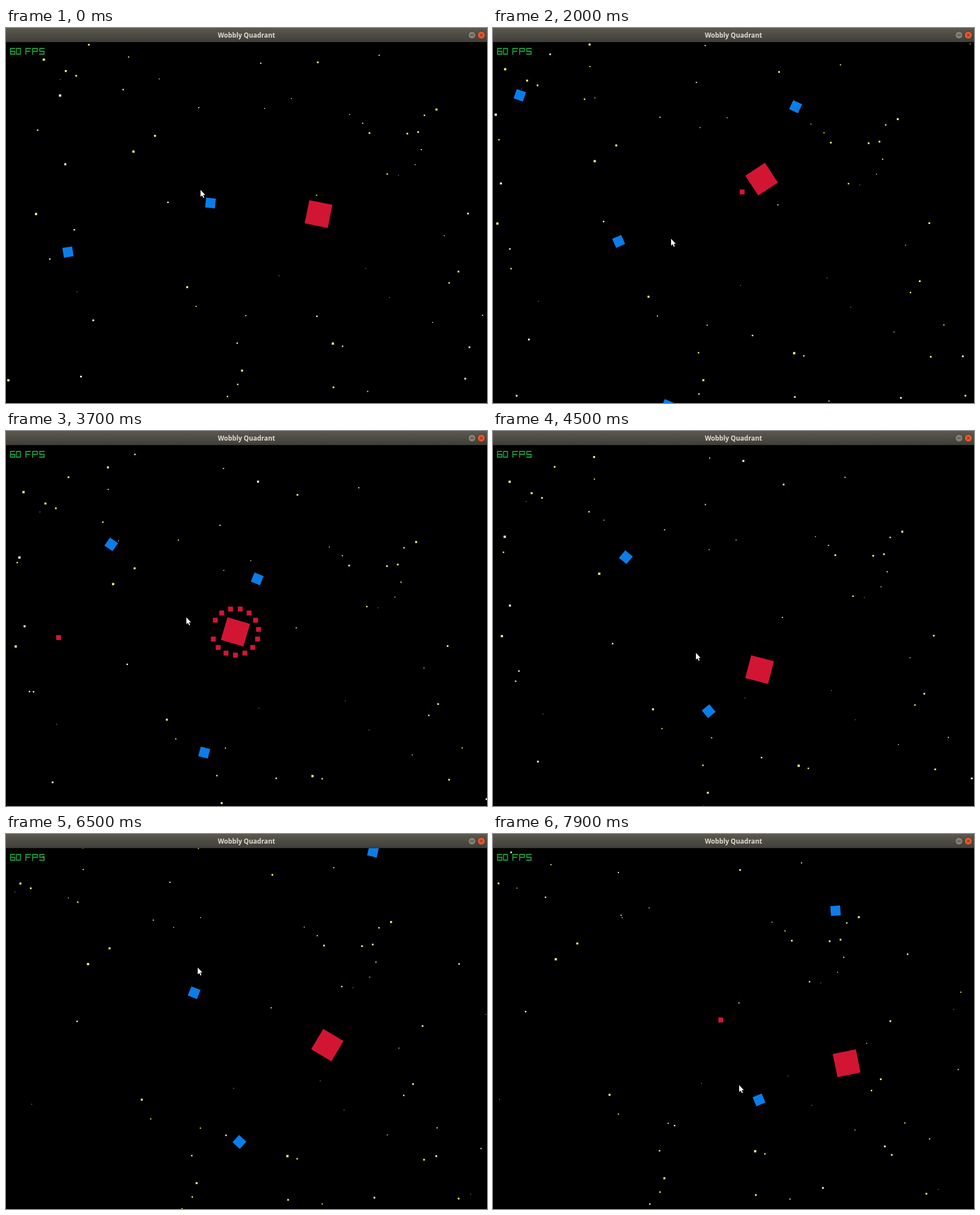
An HTML page with a canvas that plays this animation: 848x660 px, repeating every 8000 ms.

```html
<!DOCTYPE html>
<html lang="en">
<head>
<meta charset="utf-8">
<title>Wobbly Quadrant</title>
<style>
  html, body { margin: 0; width: 100%; height: 100%; overflow: hidden; background: #000; }
  canvas, svg { position: absolute; left: 0; top: 0; display: block; }
  .bar {
    position: absolute; left: 0; top: 0; width: 848px; height: 25px;
    box-sizing: border-box; border-bottom: 1px solid #33322c;
    background: linear-gradient(#5b594f, #403f39);
    color: #dfdbd2; text-align: center;
    font: bold 11.5px/25px "Open Sans", "Noto Sans", sans-serif;
  }
</style>
</head>
<body>
<canvas id="game" width="848" height="660"></canvas>
<div class="bar">Wobbly Quadrant</div>
<svg width="848" height="660" fill="none">
  <g stroke="#35342e">
    <circle cx="821.5" cy="12.5" r="6.8" fill="#807d72"/>
    <path d="M818.5 12.5h6"/>
    <circle cx="838" cy="12.5" r="6.8" fill="#e4572f"/>
    <path d="M835.7 10.2l4.6 4.6m0-4.6l-4.6 4.6" stroke="#5a2312"/>
  </g>
  <g role="img" aria-label="60 FPS" stroke="#179a3b" stroke-width="1.8">
    <path d="M16 36H8v10h7.5v-5H8"/>
    <path d="M18.5 36h7v10h-7z"/>
    <path d="M44 36h-9v11m0-6h7.5"/>
    <path d="M47 47V36h8.5v5H47"/>
    <path d="M68 36h-8.5v5h7.7v5H58.5"/>
  </g>
</svg>
<script>
const ctx = document.getElementById('game').getContext('2d');
const RED = '#d31534', BLUE = '#0b7de9', YELLOW = '#eef280', PALE = '#f6f6e4', WHITE = '#fff';
const LOOP = 8000, STEP = 100;
const CENTER = [424, 342];
const SKY_SPEED = 25, ENEMY_SPEED = 81, BULLET_SPEED = 600, MUZZLE = 41;

// Steering points of the player: [seconds, x, y]
const heroKeys = [[0, 551, 327.5], [.9, 542.7, 317], [2, 473.5, 266], [2.85, 398, 228],
  [3.7, 404.5, 353.5], [4.5, 470, 420], [5.3, 497, 379.5], [6.5, 566.5, 371.5], [7.9, 623.5, 403.5]];
const pointerKeys = [[0, 343, 285], [.9, 358, 307], [2, 314, 371], [3.2, 310, 303], [3.7, 318, 328],
  [5.3, 386, 418], [6.5, 338, 235], [7.5, 360, 293], [7.9, 434, 442]];

// Each enemy is at x, y at time t and lives until its end.
const enemies = [
  { t: 0, x: 360.5, y: 308, end: .6 },
  { t: .9, x: 159, y: 386, end: 3.4 },
  { t: 2, x: 533.5, y: 138.5, end: 3.8 },
  { t: 3.7, x: 185.5, y: 199.5, end: 7.9 },
  { t: 3.7, x: 349.5, y: 566, end: 5.4 },
  { t: 6.5, x: 411.5, y: 542, end: 8 },
  { t: 6.5, x: 647, y: 31, end: 8 },
];

// Smooth cubic through the keys.
function sample(keys, t) {
  const last = keys.length - 1;
  if (t <= keys[0][0]) return keys[0].slice(1);
  if (t >= keys[last][0]) return keys[last].slice(1);
  let i = 0;
  while (t >= keys[i + 1][0]) i++;
  const a = keys[i], b = keys[i + 1], h = b[0] - a[0], u = (t - a[0]) / h;
  const slope = (n, c) => {
    const p = keys[Math.max(n - 1, 0)], q = keys[Math.min(n + 1, last)];
    return (q[c] - p[c]) / (q[0] - p[0]) * h;
  };
  return [1, 2].map(c => {
    const m = slope(i, c), n = slope(i + 1, c), d = b[c] - a[c];
    return a[c] + u * (m + u * (3 * d - 2 * m - n + u * (m + n - 2 * d)));
  });
}

const hero = t => sample(heroKeys, t);
const pointer = t => sample(pointerKeys, t);
const angleTo = ([x, y], [tx, ty]) => Math.atan2(ty - y, tx - x);
const polar = (r, a) => [r * Math.cos(a), r * Math.sin(a)];
const add = ([a, b], [c, d]) => [a + c, b + d];
const aim = t => angleTo(hero(t), pointer(t));

// Follow a velocity field from one time to another, forwards or backwards.
function travel(pos, from, to, velocity) {
  const n = Math.ceil(Math.abs(to - from) / .02), dt = (to - from) / n;
  for (let i = 0; i < n; i++) {
    const [vx, vy] = velocity(from + (i + .5) * dt, pos);
    pos = add(pos, [vx * dt, vy * dt]);
  }
  return pos;
}

// The sky slides against the player's offset from the centre; enemies ride on it and chase.
const skyDrift = t => polar(SKY_SPEED, angleTo(hero(t), CENTER));
const chase = (t, pos) => add(skyDrift(t), polar(ENEMY_SPEED, angleTo(pos, hero(t))));

function seeded(seed) {
  return () => (seed = (seed * 16807) % 2147483647) / 2147483647;
}
const random = seeded(4711);

function makeStars(count, depth, width, color) {
  return Array.from({ length: count }, () => {
    const size = 1 + Math.round(random() * 6) / 2;
    return { x: random() * width, y: random() * 690 - 30, size, depth, color: size < 2 ? PALE : color };
  });
}
const stars = [...makeStars(60, 1, 940, YELLOW), ...makeStars(17, 2, 1030, WHITE)];

const shots = [.9, 2, 3.25, 5.3, 7.6].map(t => ({ t, angle: aim(t) }));
for (let k = 0; k < 14; k++) shots.push({ t: 3.7, angle: (210 + 24 * k) * Math.PI / 180 });

function square([x, y], size, color, angle = 0) {
  ctx.save();
  ctx.translate(x, y);
  ctx.rotate(angle);
  ctx.fillStyle = color;
  ctx.fillRect(-size / 2, -size / 2, size, size);
  ctx.restore();
}

function drawPointer([x, y]) {
  ctx.save();
  ctx.translate(x, y);
  ctx.fillStyle = WHITE;
  ctx.strokeStyle = '#000';
  const arrow = new Path2D('M0 0V12L2.8 9.4 4.8 14 6.5 13.2 4.6 8.8H8.2z');
  ctx.stroke(arrow);
  ctx.fill(arrow);
  ctx.restore();
}

function draw(t) {
  ctx.fillStyle = '#000';
  ctx.fillRect(0, 0, 848, 660);

  const [sx, sy] = travel([0, 0], 0, t, skyDrift);
  for (const { x, y, size, depth, color } of stars)
    square([x + sx * depth, y + sy * depth], size, color);

  for (const e of enemies) {
    if (t >= e.end) continue;
    const pos = travel([e.x, e.y], e.t, t, chase);
    square(pos, 17.3, BLUE, angleTo(pos, hero(t)));
  }
  for (const s of shots) {
    if (t < s.t) continue;
    square(add(hero(s.t), polar(MUZZLE + BULLET_SPEED * (t - s.t), s.angle)), 8.6, RED);
  }
  square(hero(t), 41.5, RED, aim(t));
  drawPointer(pointer(t));
}

const start = performance.now();
let shown = -1;
function tick() {
  const frame = Math.floor((performance.now() - start) % LOOP / STEP);
  if (frame !== shown) draw(frame * STEP / 1000);
  shown = frame;
  requestAnimationFrame(tick);
}
tick();
</script>
</body>
</html>
```
